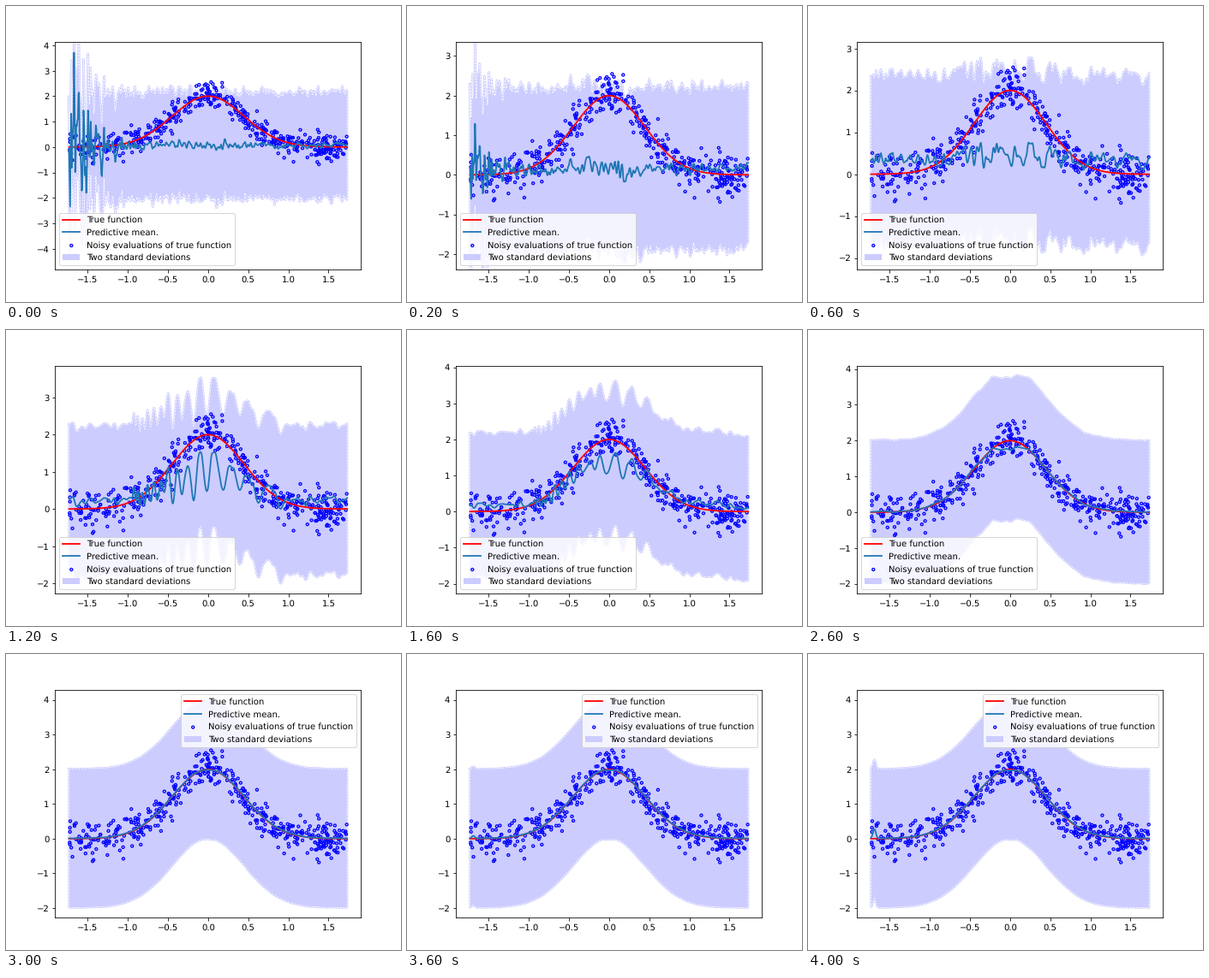
A matplotlib script for the animation above (4200 ms loop, 461 by 346 pixels).

```python
import numpy as np
import matplotlib.pyplot as plt
from matplotlib.animation import FuncAnimation

FRAMES, INTERVAL, DPI = 21, 200, 72
WIDTH, HEIGHT = 461, 346
EDGE = np.sqrt(3)
BAND = "#ccccff"
plt.rcParams.update({"text.hinting": "none", "lines.linewidth": 1.8})

x = np.linspace(-EDGE, EDGE, 500)


def true_function(t):
    return 2 * np.exp(-2.5 * t**2)


def smooth_noise(seed, width):
    """Unit-variance random curve with correlation length `width`."""
    rng = np.random.default_rng(seed)
    u = np.arange(-40, 41) * (x[1] - x[0])
    kernel = np.exp(-0.5 * (u / width) ** 2)
    kernel /= np.sqrt(np.sum(kernel**2))
    curve = np.convolve(rng.normal(size=x.size + 80), kernel, "valid")
    return np.clip(curve, -2.4, 2.4)


def smoothstep(t):
    t = np.clip(t, 0, 1)
    return t * t * (3 - 2 * t)


truth = true_function(x)
rng = np.random.default_rng(4)
data_x = rng.uniform(-EDGE, EDGE, 490)
data_y = true_function(data_x) + np.clip(rng.normal(0, 0.26, data_x.size), -0.7, 0.7)


def comb(i):
    """Ripples under the peak whose spacing grows by 15 % from one to the next."""
    phase = np.log(np.maximum(x + 1.25, 0.3) / 1.32) / np.log(1.15)
    strength = 0.31 * np.exp(-((i - 6) / 2.4) ** 2)
    return strength * np.sqrt(truth) * np.cos(2 * np.pi * phase)


def left_spikes(i):
    """Wild oscillation at the left end that dies out quickly."""
    wave = np.exp(-(x + EDGE) / 0.24) * smooth_noise(7, 0.006)
    return 2.4 * np.exp(-1.2 * i) * wave / -wave.min()


def predict(i):
    gain = smoothstep((i - 1) / 12)
    cap = np.interp(i, [13, 14], [1.76, 1.97])
    base = np.interp(i, [0, 3, 13], [0.06, 0.33, 0.01])
    rough = np.interp(i, [0, 3, 13, 15], [0.05, 0.09, 0.012, 0.003])
    length = np.interp(i, [0, 13], [0.008, 0.03])
    late_bump = 0.27 * smoothstep((i - 17) / 3) * np.exp(-0.5 * ((x + 1.69) / 0.018) ** 2)

    mean = gain * np.minimum(truth, cap) + base + comb(i) + left_spikes(i) + late_bump
    mean += rough * (1 + 0.6 * truth) * smooth_noise(50 + i, length)
    jitter = 0.12 * np.exp(-i / 2)
    spread = 2 + jitter * np.abs(smooth_noise(90 + i, 0.008))
    return mean, spread


def limits(i):
    top = np.interp(i, [0, 1, 3, 6, 8, 13, 14], [4.12, 3.35, 3.15, 3.84, 4.03, 4.08, 4.28])
    bottom = np.interp(i, [0, 1, 3], [-4.83, -2.4, -2.28])
    return bottom, top


fig = plt.figure(figsize=(WIDTH / DPI, HEIGHT / DPI), dpi=DPI)
ax = fig.add_axes([57.3 / WIDTH, 37.6 / HEIGHT, 357.1 / WIDTH, 266.1 / HEIGHT])


def draw(i):
    ax.clear()
    mean, spread = predict(i)
    low, high = mean - spread, mean + spread
    true_line, = ax.plot(x, truth, color="red")
    mean_line, = ax.plot(x, mean, color="C0")
    band = ax.fill_between(x, low, high, color=BAND, lw=0)

    # A broken white hairline runs just inside the border of the band.
    border_x = np.concatenate([x, x[::-1], x[:1]])
    border_y = np.concatenate([high, low[::-1], high[:1]])
    ax.plot(border_x, border_y, color=BAND, lw=2.2, zorder=1)
    ax.plot(border_x, border_y, color="white", lw=0.8, ls=(0, (3, 1.5)), zorder=1)

    points = ax.scatter(data_x, data_y, s=9, facecolors="none", edgecolors="blue",
                        lw=1.3, zorder=1.5)
    ax.set_xlim(-1.1 * EDGE, 1.1 * EDGE)
    ax.set_ylim(*limits(i))
    ax.legend([true_line, mean_line, points, band],
              ["True function", "Predictive mean.",
               "Noisy evaluations of true function", "Two standard deviations"],
              loc="lower left" if i < 14 else "upper right")


animation = FuncAnimation(fig, draw, frames=FRAMES, interval=INTERVAL,
                          init_func=lambda: None, repeat=True, repeat_delay=0)
plt.show()
```
